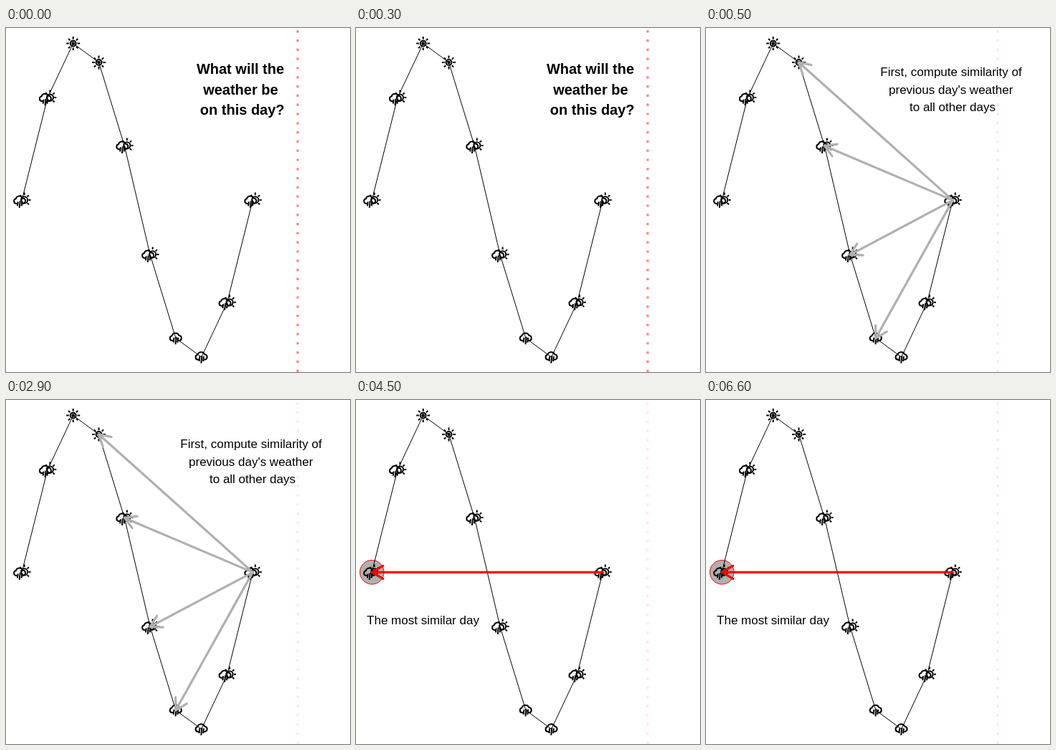
An HTML page for the animation above (8 s loop, 480 px wide and 480 px high).

```html
<!DOCTYPE html>
<html lang="en">
<head>
<meta charset="utf-8">
<title>Weather similarity</title>
<style>
html, body { margin: 0; width: 100%; height: 100%; overflow: hidden; background: #fff; }
svg { display: block; width: 100vw; height: 100vh; }
text { font: 17px "Liberation Sans", Arial, sans-serif; text-anchor: middle; }
.question text { font-size: 20px; font-weight: bold; }
.icon { fill: none; stroke: #000; stroke-width: 2; stroke-linejoin: round; }
.arrow { fill: none; stroke-width: 3.2; stroke-linecap: round; stroke-linejoin: round; }
.question { animation: question 8s step-end infinite; }
.compare { animation: compare 8s step-end infinite; }
.nearest { animation: nearest 8s step-end infinite; }
.day { stroke: #ff8080; stroke-width: 3.2; animation: fade 8s step-end infinite; }
@keyframes question { 0% { visibility: visible } 6.25%, 100% { visibility: hidden } }
@keyframes compare { 0%, 56.25%, 100% { visibility: hidden } 6.25% { visibility: visible } }
@keyframes nearest { 0% { visibility: hidden } 56.25%, 100% { visibility: visible } }
@keyframes fade { 0% { stroke: #ff8080 } 6.25%, 100% { stroke: #ffe5e5 } }
</style>
</head>
<body>
<svg viewBox="0 0 480 480">
  <defs>
    <g id="sun" class="icon">
      <circle r="3.9"/>
      <circle r="2.3" fill="#000" stroke="none"/>
      <path d="M5.8 0H9.5M-5.8 0H-9.5M0 5.8V9.5M0-5.8V-9.5M4.3 4.3 6.6 6.6M-4.3 4.3-6.6 6.6M4.3-4.3 6.6-6.6M-4.3-4.3-6.6-6.6"/>
    </g>
    <g id="rain" class="icon">
      <path d="M-3.5 3.5H-5A3.4 3.4 0 0 1-5.5-3.2A5.4 5.4 0 0 1 4.6-3.8A3.7 3.7 0 0 1 5 3.5H3.5"/>
      <path d="M-2.4-1-3.2 6M.6-2-.4 8.5M3.2-1 2.4 6"/>
    </g>
    <g id="mixed" class="icon">
      <path d="M-6.5 4.5H-8A3.4 3.4 0 0 1-8.3-2.2A5 5 0 0 1 1-3A3.7 3.7 0 0 1 1.5 4.5H0"/>
      <path d="M-5.4 2-6.2 8M-2.4 1-3.4 10.5M.4 1-.4 8"/>
      <circle cx="3.5" cy="-.5" r="4.6"/>
      <path d="M3.5-7.3V-11M-.8-5.6-2.6-7.4M7.6-5 9.8-7.2M9.4-.5H12.4M7.6 3.8 9.8 6"/>
    </g>
  </defs>
  <path class="day" d="M407 480V0" stroke-dasharray="3.2 9.6"/>
  <circle class="nearest" cx="22.2" cy="240.3" r="16.8" fill="#b0b0b0" stroke="red"/>
  <polyline id="curve" fill="none" stroke="#000"/>
  <g id="days"></g>
  <g class="question">
    <text x="327" y="64">What will the</text>
    <text x="327.4" y="93">weather be</text>
    <text x="329.7" y="121">on this day?</text>
  </g>
  <g class="compare">
    <g id="candidates" stroke="#b0b0b0"></g>
    <text x="342" y="67">First, compute similarity of</text>
    <text x="341.7" y="92">previous day's weather</text>
    <text x="344" y="116">to all other days</text>
  </g>
  <g class="nearest">
    <g id="match" stroke="red"></g>
    <text x="93.5" y="313">The most similar day</text>
  </g>
</svg>
<script>
const byId = id => document.getElementById(id);
const points = Array.from({ length: 10 }, (_, i) =>
  [22.1 + 35.8 * i, 240.4 - 222.2 * Math.sin(i * Math.PI * 2 / 9)]);
const today = points[9];

function add(parent, tag, attributes) {
  const node = document.createElementNS('http://www.w3.org/2000/svg', tag);
  for (const [key, value] of Object.entries(attributes)) node.setAttribute(key, value);
  byId(parent).append(node);
}

function arrow(parent, [x, y]) {
  const angle = Math.atan2(today[1] - y, today[0] - x);
  const barb = turn => [x + 18 * Math.cos(angle + turn), y + 18 * Math.sin(angle + turn)];
  add(parent, 'path', {
    class: 'arrow',
    d: `M${today}L${x} ${y}M${barb(Math.PI / 6)}L${x} ${y}L${barb(-Math.PI / 6)}`
  });
}

byId('curve').setAttribute('points', points.join(' '));
points.forEach(([x, y]) => {
  const kind = y < 50 ? 'sun' : y > 430 ? 'rain' : 'mixed';
  add('days', 'use', { href: '#' + kind, x, y });
});
points.slice(3, 7).forEach(point => arrow('candidates', point));
arrow('match', points[0]);
</script>
</body>
</html>
```
